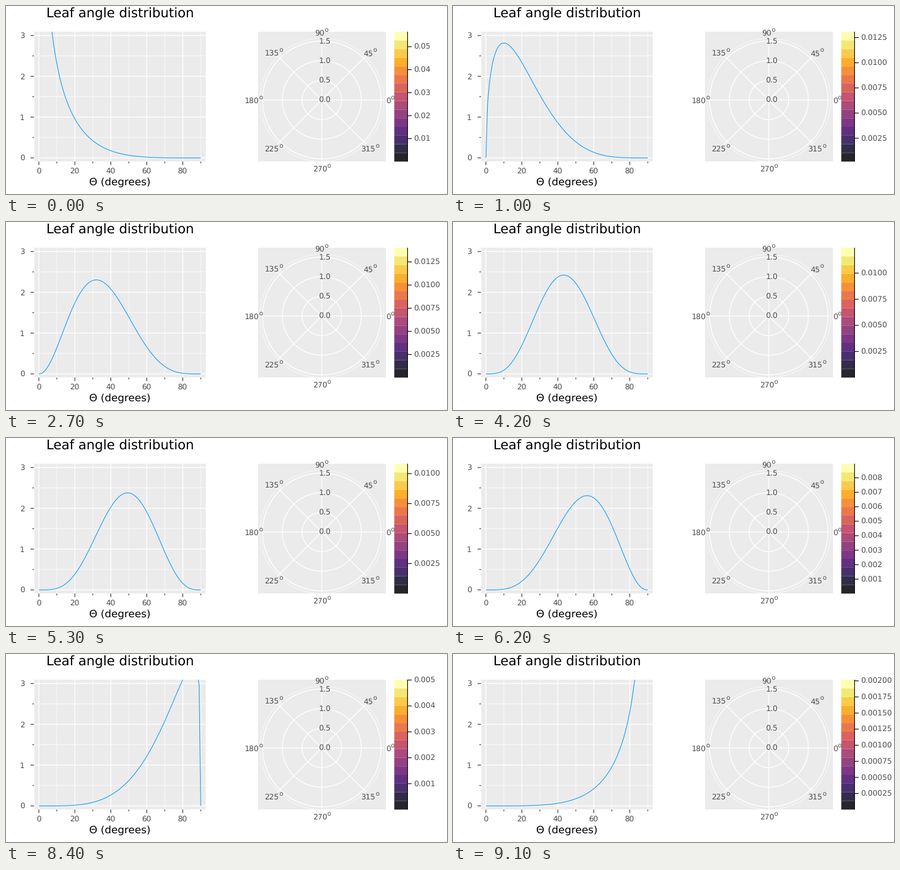
These frames come from a looping animation (700 px wide and 300 px high, 9.2 s). A matplotlib script:

```python
import math
import numpy as np
import matplotlib
import matplotlib.pyplot as plt
from matplotlib.animation import FuncAnimation
from matplotlib.patches import Circle, Rectangle

matplotlib.rcParams["font.family"] = "DejaVu Sans"
matplotlib.rcParams["text.hinting"] = "none"

W, H, DPI = 700, 300, 100
PX = 72 / DPI
STEPS = 46
FRAMES = 2 * STEPS
PANEL, GREY, INK = "#ebebeb", "#4d4d4d", "#333333"
TICK_SIZE, LABEL_SIZE, TITLE_SIZE = 12, 16.45, 20.85

fig = plt.figure(figsize=(W / DPI, H / DPI), dpi=DPI, facecolor="white")
ax = fig.add_axes([0, 0, 1, 1])
ax.set_xlim(0, W)
ax.set_ylim(H, 0)
ax.axis("off")


def text(x, y, s, size=TICK_SIZE, color=GREY, ha="center"):
    return ax.text(x, y, s, fontsize=size * PX, color=color, ha=ha,
                   va="baseline", zorder=6)


def stroke(xs, ys, color="white", width=1.3, z=2):
    line, = ax.plot(xs, ys, color=color, lw=width * PX, zorder=z,
                    solid_capstyle="butt", snap=False)
    return line


def box(left, top, right, bottom, color, **style):
    return ax.add_patch(Rectangle((left, top), right - left, bottom - top,
                                  facecolor=color, lw=0, zorder=1, **style))


# ---- leaf angle distribution ----
LEFT, TOP, RIGHT, BOTTOM = 44.5, 41, 317, 248.3
MID_DIGIT = 4.4


def px(deg):
    return 52.2 + 2.855 * deg


def py(v):
    return 242.4 - 65.1 * v


def draw_density_axes():
    panel = box(LEFT, TOP, RIGHT, BOTTOM, PANEL)
    for k in range(10):
        x, major = px(10 * k), k % 2 == 0
        stroke([x, x], [TOP, BOTTOM], width=1.3 if major else 0.7)
        stroke([x, x], [BOTTOM, BOTTOM + (5.5 if major else 2.7)], INK, 1.1)
        if major:
            text(x - 0.4, 268.3, str(10 * k))
    for k in range(7):
        y, major = py(k / 2), k % 2 == 0
        stroke([LEFT, RIGHT], [y, y], width=1.3 if major else 0.7)
        stroke([LEFT - (5.5 if major else 2.7), LEFT], [y, y], INK, 1.1)
        if major:
            text(29.7, y + MID_DIGIT, str(k // 2), ha="right")
    text(180.9, 18.5, "Leaf angle distribution", TITLE_SIZE, "black")
    text(180.8, 285.4, "Θ (degrees)", LABEL_SIZE, "black")
    return panel


# ---- polar panel ----
CX, CY, UNIT = 501.3, 149.9, 62.7
RIM = UNIT * math.pi / 2
RING_SIZE = 10


def draw_polar_axes():
    box(400.3, TOP, 602.7, BOTTOM, PANEL)
    for deg in range(0, 360, 45):
        c, s = math.cos(math.radians(deg)), math.sin(math.radians(deg))
        stroke([CX, CX + RIM * c], [CY, CY - RIM * s])
        x, y = CX + 1.1 * RIM * c, CY - 1.1 * RIM * s
        digits = 0.636 * TICK_SIZE * len(str(deg))
        start = x - (digits + 0.61 * RING_SIZE) / 2
        text(start, y + 6.4, str(deg), ha="left")
        text(start + digits, y - 0.7, "o", RING_SIZE, ha="left")
    for r in (0.5, 1.0, 1.5, math.pi / 2):
        width = 1.3 if r <= 1.5 else 0.6
        ax.add_patch(Circle((CX, CY), r * UNIT, fill=False, ec="white",
                            lw=width * PX, zorder=2))
    for r in (0.0, 0.5, 1.0, 1.5):
        text(506.1, CY - r * UNIT + MID_DIGIT, f"{r:.1f}")


# ---- colour bar ----
BAR_LEFT, BAR_RIGHT, BANDS = 616.3, 637.4, 15


def draw_bar():
    cmap = matplotlib.colormaps["inferno"]
    h = (BOTTOM - TOP) / BANDS
    for k in range(BANDS):
        low = BOTTOM - k * h
        box(BAR_LEFT, low - h, BAR_RIGHT, low, cmap(k / (BANDS - 1)),
            alpha=0.85, snap=False)
    stroke([BAR_RIGHT, BAR_RIGHT], [TOP, BOTTOM], "black", 1.1, 4)


def bar_step(span):
    """Half of the 1-2-5 tick unit for this span."""
    n = math.floor(math.log10(span))
    f = span / 10 ** n
    unit = 2 if f > 5 else 1 if f > 2.5 else 0.5
    return 0.5 * unit * 10.0 ** n


# ---- model: specular reflection from beta distributed leaves ----
def beta_pdf(x, a, b):
    norm = math.exp(math.lgamma(a + b) - math.lgamma(a) - math.lgamma(b))
    with np.errstate(divide="ignore"):
        return norm * x ** (a - 1) * (1 - x) ** (b - 1)


def specular_grid(n=180, source=119, index=1.5, rough=0.2):
    """Normalised facet angle and reflectance for each outgoing direction."""
    nodes, _ = np.polynomial.legendre.leggauss(n)
    mu = (nodes[:, None] + 1) / 2
    phi = np.linspace(0, 2 * math.pi, 200)[None, :]
    mu_in = mu[source, 0]
    dot = mu_in * mu + np.sqrt((1 - mu_in ** 2) * (1 - mu ** 2)) * np.cos(phi)
    half = np.arccos(np.clip(dot, -1, 1)) / 2
    ci = np.cos(half)
    facet = np.arccos(np.clip((mu_in + mu) / (2 * ci), -1, 1))
    ct = np.sqrt(1 - (np.sin(half) / index) ** 2)
    rs = (ci - index * ct) / (ci + index * ct)
    rp = (index * ci - ct) / (index * ci + ct)
    fresnel = (rs ** 2 + rp ** 2) / 2
    gain = fresnel * np.exp(-rough * np.tan(half)) / (4 * math.pi)
    return np.clip(2 * facet / math.pi, 1e-6, 1 - 1e-6), gain


FACET, GAIN = specular_grid()
XS = np.linspace(0, 1, 101)

panel = draw_density_axes()
draw_polar_axes()
draw_bar()
curve = stroke([], [], "#009afa", 1.0, 5)
curve.set_clip_path(panel)
ticks = [(stroke([], [], "black", 1.1, 4), text(647.6, 0, "", ha="left"))
         for _ in range(12)]


def shape(i):
    if i < STEPS:
        return 0.5 + 0.1 * i, 5.0
    return 5.0, 5.0 - 0.1 * (i - STEPS)


def update(i):
    a, b = shape(i)
    density = beta_pdf(XS, a, b)
    density[~np.isfinite(density)] = np.nan
    curve.set_data(px(90 * XS), py(density))

    z = GAIN * beta_pdf(FACET, a, b)
    lo, hi = z.min(), z.max()
    step = bar_step(hi - lo)
    places = len(f"{step:.8f}".rstrip("0").split(".")[1])
    first = max(1, math.ceil(lo / step))
    for k, (mark, label) in enumerate(ticks, first):
        v = k * step
        shown = v <= hi
        mark.set_visible(shown)
        label.set_visible(shown)
        if shown:
            y = BOTTOM - (BOTTOM - TOP) * (v - lo) / (hi - lo)
            mark.set_data([BAR_RIGHT, BAR_RIGHT + 6.5], [y, y])
            label.set_y(y + MID_DIGIT)
            label.set_text(f"{v:.{places}f}")
    return [curve] + [part for pair in ticks for part in pair]


anim = FuncAnimation(fig, update, frames=FRAMES, interval=100, repeat=True,
                     repeat_delay=0)
plt.show()
```
